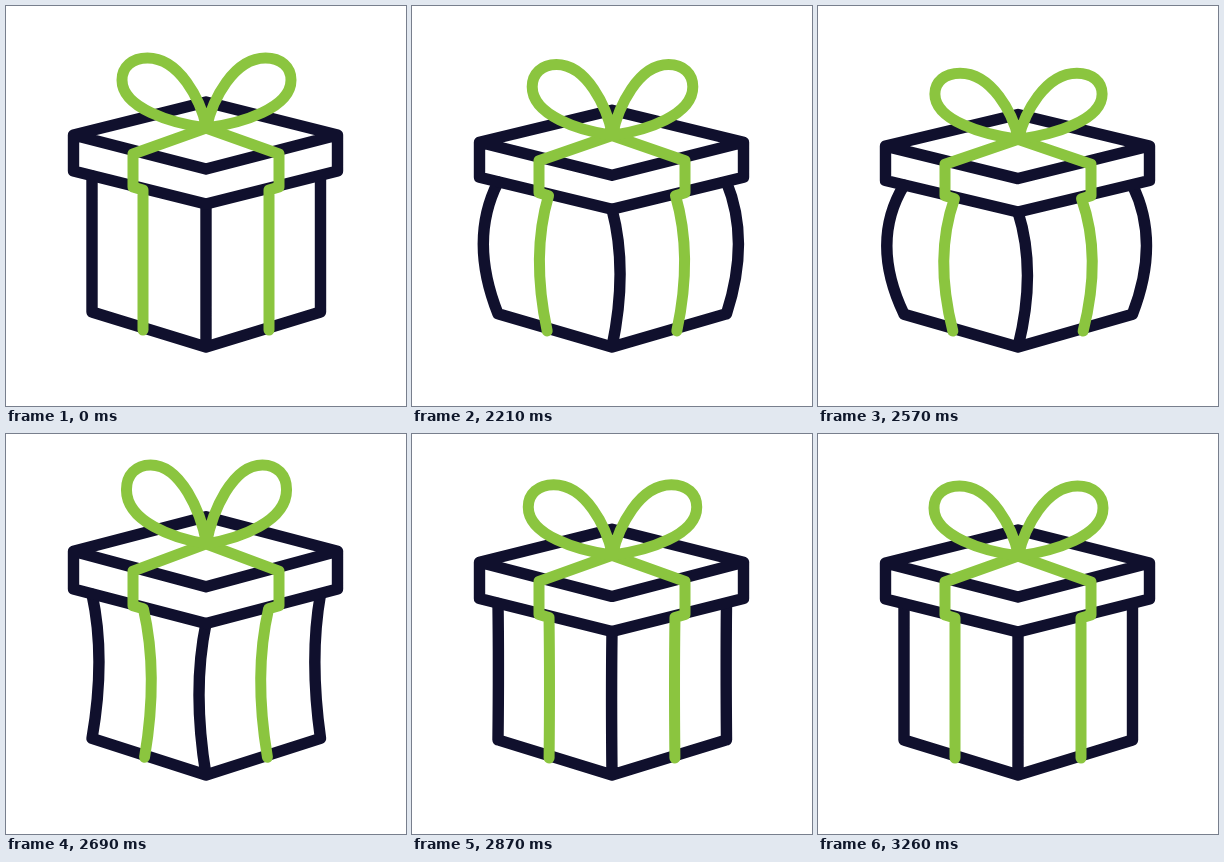
Animation of 400 by 400 pixels, one loop 3350 ms. Source, as an HTML page:

```html
<!DOCTYPE html>
<html lang="en">
<head>
<meta charset="utf-8">
<title>Gift box</title>
<style>
html, body { margin: 0; width: 100%; height: 100%; overflow: hidden; background: #fff; }
svg { display: block; width: 100vw; height: 100vh; }
path { fill: none; stroke-linecap: round; stroke-linejoin: round; }
.box path { stroke: #10102d; stroke-width: 11.4; }
.ribbon path { stroke: #8bc53f; stroke-width: 11; }
</style>
</head>
<body>
<svg viewBox="0 0 400 400">
  <g class="box"><path id="body"/><path id="lid"/></g>
  <g class="ribbon"><path id="band"/><path id="bow"/></g>
</svg>
<script>
const LOOP = 3350, STEP = 30;
const PRESS = 2030, RELEASE = 2555, PEAK = 2695, SETTLE = 2900, REST = 3260;

const part = (t, from, to) => (t - from) / (to - from);
const smooth = u => u * u * (3 - 2 * u);

// 1 is fully squashed, 0 at rest, -1 fully stretched
function squash(t) {
  if (t < PRESS || t >= REST) return 0;
  if (t < RELEASE) return 1 - (1 - part(t, PRESS - STEP, RELEASE)) ** 2;
  if (t < PEAK) return 1 - 2 * smooth(part(t, RELEASE, PEAK));
  if (t < SETTLE) return smooth(part(t, PEAK, SETTLE)) - 1;
  const u = part(t, SETTLE, REST);
  return 0.08 * (1 - u) * Math.sin(2 * Math.PI * u);
}

const fix = n => +n.toFixed(2);
const line = pts => 'M' + pts.map(p => p.map(fix).join(' ')).join('L');
const set = (id, d) => document.getElementById(id).setAttribute('d', d);

// quadratic arc whose belly sits a little above the middle
const arc = (x0, y0, x1, y1, side) =>
  `Q${fix((x0 + x1) / 2 + side * 2)} ${fix(y0 + (y1 - y0) * 0.44)} ${fix(x1)} ${fix(y1)}`;

function draw(t) {
  const a = squash(t);
  const bulge = a > 0 ? 1.08 * a * (2 - a) : 0.8 * a;
  const outer = a > 0 ? bulge : bulge * 0.55;
  const pinch = a > 0 ? Math.sin(Math.PI * a) : -a;
  const bowW = 1 - 0.053 * pinch;
  const bowH = 1 - 0.07 * a + 0.06 * pinch;

  const tall = 1 - 0.047 * a;
  const y = n => 198 + 8.6 * a + (n - 198) * tall;

  const foot = 306 + 2 * bulge, top = y(170);
  const edge = (x, y0, y1, side) => line([[x, y0]]) + arc(x, y0, x, y1, side);
  set('body',
    edge(86, top, foot, -16 * outer) +
    edge(314.5, top, foot, 13 * outer) +
    edge(200, y(198), 341, 8.8 * bulge) +
    line([[86, foot], [200, 341], [314.5, foot]]));

  const left = 67.5, right = 331.5;
  set('lid',
    line([[200, y(96)], [right, y(129)], [200, y(163)], [left, y(129)]]) + 'Z' +
    line([[left, y(129)], [left, y(165)], [200, y(198)], [right, y(165)], [right, y(129)]]));

  const knot = y(122);
  const strip = dir => {
    const x = n => 200 + dir * n;
    const x0 = x(63 + 0.5 * bulge), x1 = x(63 + 2 * bulge);
    return line([[200, knot], [x(73), y(148)], [x(73), y(181)], [x0, y(184)]]) +
      arc(x0, y(184), x1, 324 + bulge, dir * 9.2 * bulge);
  };
  set('band', strip(-1) + strip(1));

  const loop = dir => {
    const p = (dx, dy) => fix(200.5 + dir * dx * bowW) + ' ' + fix(knot - dy * bowH);
    return `M${p(0, 1)}C${p(6, 28)} ${p(27, 70)} ${p(59, 70)}` +
      `C${p(74.5, 70)} ${p(84.5, 61)} ${p(84.5, 48)}` +
      `C${p(84.5, 20)} ${p(36, 5)} ${p(0, 0)}`;
  };
  set('bow', loop(-1) + loop(1));
}

const origin = performance.now();
function tick() {
  const t = (performance.now() - origin) % LOOP;
  draw(PRESS + Math.floor((t - PRESS) / STEP) * STEP);
  requestAnimationFrame(tick);
}
tick();
</script>
</body>
</html>
```
